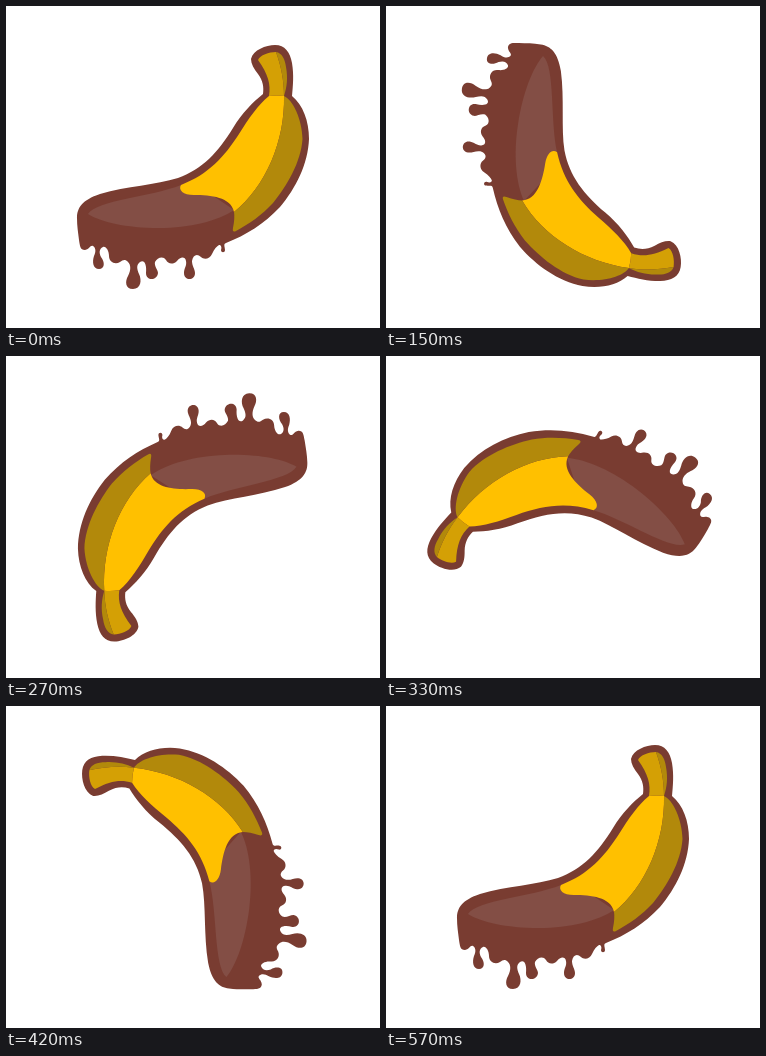
These frames come from a looping animation (374 by 322 pixels, 0.6 s). An HTML page:

```html
<!DOCTYPE html>
<html lang="en">
<head>
<meta charset="utf-8">
<title>Spinning banana</title>
<style>
  html, body { margin: 0; width: 100%; height: 100%; overflow: hidden; background: #fff; }
  svg { display: block; width: 100%; height: 100%; }
</style>
</head>
<body>
<svg viewBox="0 0 374 322">
  <g id="banana">
    <!-- outline and chocolate drips -->
    <path fill="#793c31" d="M71 212C71 202 76 194 94 188C121 180 150 179 172 172
      C197 163 212 146 227 122C236 107 247 96 257 88C258 81 257 75 252 68
      C248 63 245 58 245 53C247 44 260 39 269 39C279 39 284 46 286 57
      C288 69 287 80 286 90C297 99 303 115 303 133C302 158 290 182 274 201
      C258 218 240 229 220 237C217 238 219 241 219 244C219 247 215 247 215 244
      C216 241 215 239 213 239C211 240 208 243 206 248C204 253 198 254 195 251
      C191 247 187 249 186 255C186 260 189 263 189 267C189 275 178 275 178 267
      C178 262 181 260 180 255C179 250 174 251 171 255C167 259 162 258 160 254
      C157 249 151 252 149 256C148 260 152 264 152 267C151 275 140 275 140 267
      C141 258 138 253 134 256C130 259 131 263 133 268C136 274 135 283 127 283
      C119 283 119 275 122 270C125 264 125 259 122 256C119 253 117 254 114 256
      C109 259 103 256 103 250C103 245 100 240 97 241C93 243 93 247 95 251
      C99 256 99 263 93 263C87 263 86 256 88 250C90 246 90 242 87 240
      C84 239 84 243 79 244C74 244 74 240 73 234C72 226 71 220 71 212Z"/>
    <!-- chocolate top -->
    <path fill="#834e45" d="M82 208C91 194 145 191 175 179L200 185L228 204
      C212 215 183 222 153 222C120 222 95 216 82 208Z"/>
    <!-- lit flesh, shaded side -->
    <path fill="#ffc000" d="M175 179C203 168 218 151 233 128C243 112 252 99 263 90
      Q271 89 278 90C279 135 260 180 228 206C225 191 205 189 188 189
      C177 189 172 184 175 179Z"/>
    <path fill="#b2890b" d="M278 90C287 94 296 113 296.5 133C295 156 281 180 267 197
      C256 209 243 218 230 225Q226 227 227 222Q229 212 228 206
      C260 180 279 135 278 90Z"/>
    <!-- stem -->
    <path fill="#d4a005" d="M252 54C254 49 263 46 270 46C275 60 278 74 278 90
      Q271 89 263 90C265 78 262 68 252 54Z"/>
    <path fill="#b2890b" d="M270 46C276 47 279 53 280 61C282 72 281 81 278 90
      C278 74 275 60 270 46Z"/>
  </g>
</svg>
<script>
  const LOOP = 600, STEP = 30, TURN = 19.8;
  const banana = document.getElementById('banana');

  function draw(now) {
    const step = Math.floor((now % LOOP) / STEP);
    // the last step closes the turn and rests before the loop restarts
    const angle = Math.min(step * TURN, 360);
    banana.setAttribute('transform', `rotate(${angle} 187 161)`);
    requestAnimationFrame(draw);
  }
  draw(0);
</script>
</body>
</html>
```
